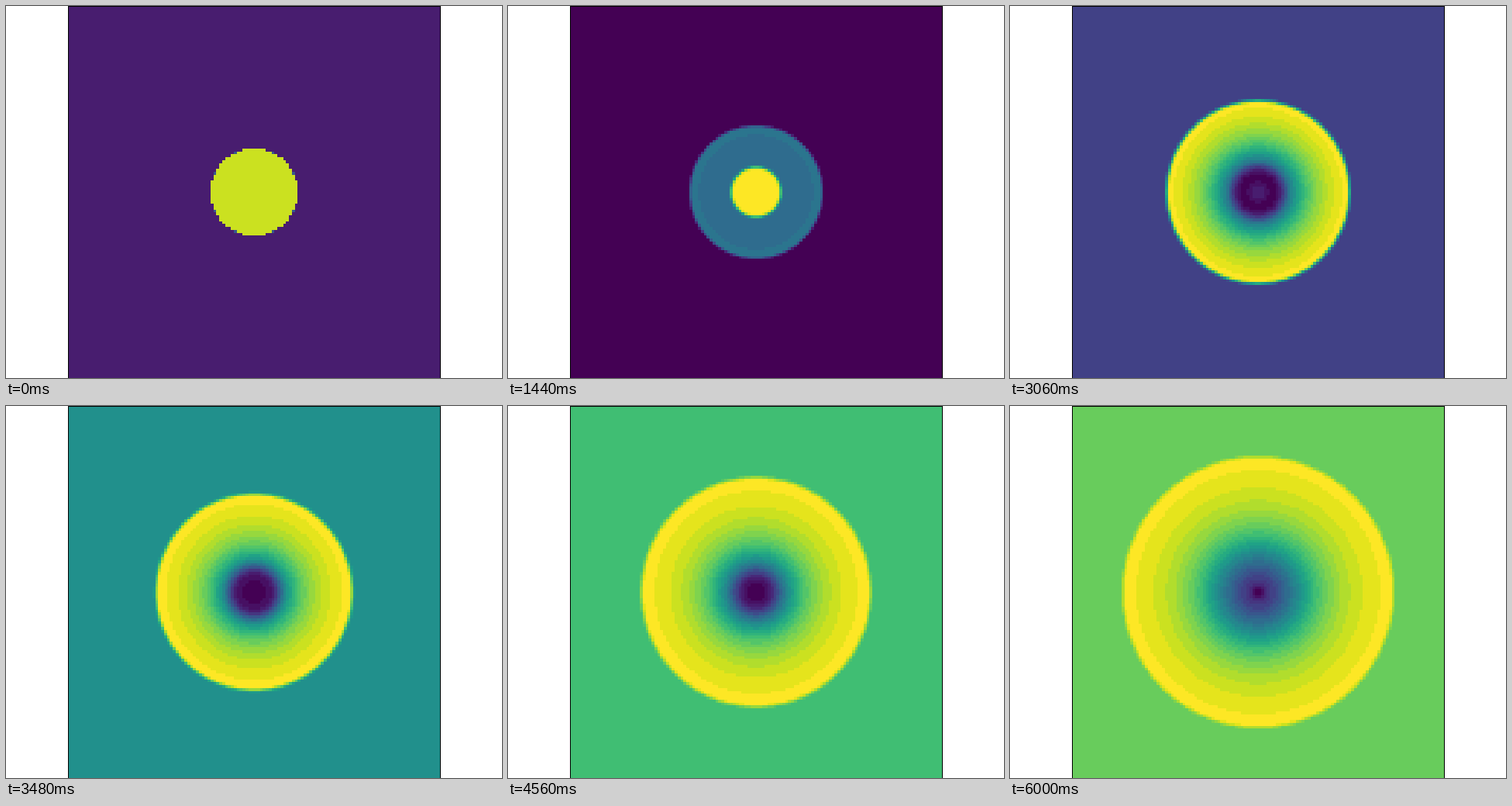
Write an HTML page with a canvas that moves like this. It is 640 px wide and 480 px high and loops after 6.06 s.

```html
<!DOCTYPE html>
<html lang="en">
<head>
<meta charset="utf-8">
<title>Circular wave</title>
<style>
html, body { margin: 0; width: 100%; height: 100%; overflow: hidden; background: #fff; }
canvas { display: block; }
</style>
</head>
<body>
<canvas id="stage" width="640" height="480"></canvas>
<script>
const FRAMES = 101, STEP = 60, N = 128, CELL = 3.75, LEVELS = 26;

const VIRIDIS = ('440154 481568 482677 453781 3f4788 39558c 32648e 2d718e 287d8e 238a8d ' +
  '1f968b 20a386 29af7f 3cbc75 56c667 74d055 94d840 b8de29 dce318 fde725')
  .split(' ').map(c => [0, 2, 4].map(i => parseInt(c.slice(i, i + 2), 16)));

const palette = Array.from({ length: LEVELS + 1 }, (_, i) => {
  const p = i / LEVELS * (VIRIDIS.length - 1);
  const k = Math.min(Math.floor(p), VIRIDIS.length - 2);
  return VIRIDIS[k].map((a, j) => a + (VIRIDIS[k + 1][j] - a) * (p - k));
});

function smooth(a, b, x) {
  const u = Math.min(1, Math.max(0, (x - a) / (b - a)));
  return u * u * (3 - 2 * u);
}

// Flat top of radius r that falls off faster for a larger power.
const plateau = (d, r, power) => 1 / (1 + (d / r) ** power);

// Height over the ambient level at distance d (px) for step t.
function waveAt(t) {
  const foot = 56.3 + 1.36 * t - .00135 * t * t;
  const width = Math.min(.3 + .2 * t, 8);
  const crest = .46 * Math.exp(-.0078 * t);

  // Broad hollow left behind the front, and the deeper pit in its middle.
  const hollow = (.1 + .005 * t) * smooth(12, 38, t);
  const hollowR = 32 + .35 * t;
  const pit = .34 * Math.max(0, Math.sin(Math.PI * (t - 48) / 70)) ** .75;
  const pitR = 34 - .0105 * (t - 55) ** 2;
  const pitPower = 8 * .96 ** (t - 58);

  // What remains of the raised disc shrinks, softens and sinks.
  const core = (1 - crest + hollow + pit) * (1 - smooth(32, 55, t));
  const coreR = Math.max(16, 56.2 - t);
  const corePower = Math.max(2.5, 700 * Math.exp(-.132 * t));

  return d => {
    if (d >= foot) return 0;
    let h = crest - hollow * plateau(d, hollowR, 3) * (1 - (d / foot) ** 6);
    if (pit) h -= pit * plateau(d, pitR, pitPower);
    if (core) h += core * plateau(d, coreR, corePower);
    return h * (1 - smooth(foot - width, foot, d));
  };
}

const ctx = document.getElementById('stage').getContext('2d');
const grid = document.createElement('canvas');
grid.width = grid.height = N;
const gridCtx = grid.getContext('2d');
const image = gridCtx.createImageData(N, N);
const field = new Float32Array(N * N);

function draw(t) {
  const height = waveAt(t);
  let lo = Infinity, hi = -Infinity;
  for (let i = 0; i < N * N; i++) {
    const x = i % N - N / 2 + .5, y = Math.floor(i / N) - N / 2 + .5;
    const h = field[i] = height(Math.hypot(x, y) * CELL);
    lo = Math.min(lo, h);
    hi = Math.max(hi, h);
  }

  // The colour range starts a little wider than the data.
  const slack = Math.max(0, 1 - t / 11) ** 1.5;
  lo -= .09 * slack;
  hi += .07 * slack;

  for (let i = 0; i < N * N; i++) {
    const [r, g, b] = palette[Math.round((field[i] - lo) / (hi - lo) * LEVELS)];
    image.data.set([r, g, b, 255], i * 4);
  }
  gridCtx.putImageData(image, 0, 0);

  ctx.fillStyle = '#fff';
  ctx.fillRect(0, 0, 640, 480);
  ctx.imageSmoothingEnabled = false;
  ctx.drawImage(grid, 80, 0, 480, 480);
  ctx.fillStyle = '#000';
  ctx.fillRect(80, 0, 481, 1);
  ctx.fillRect(80, 0, 1, 480);
  ctx.fillRect(560, 0, 1, 480);
}

let shown = -1;
function tick() {
  const t = Math.floor(performance.now() / STEP) % FRAMES;
  if (t !== shown) draw(shown = t);
  requestAnimationFrame(tick);
}
tick();
</script>
</body>
</html>
```
